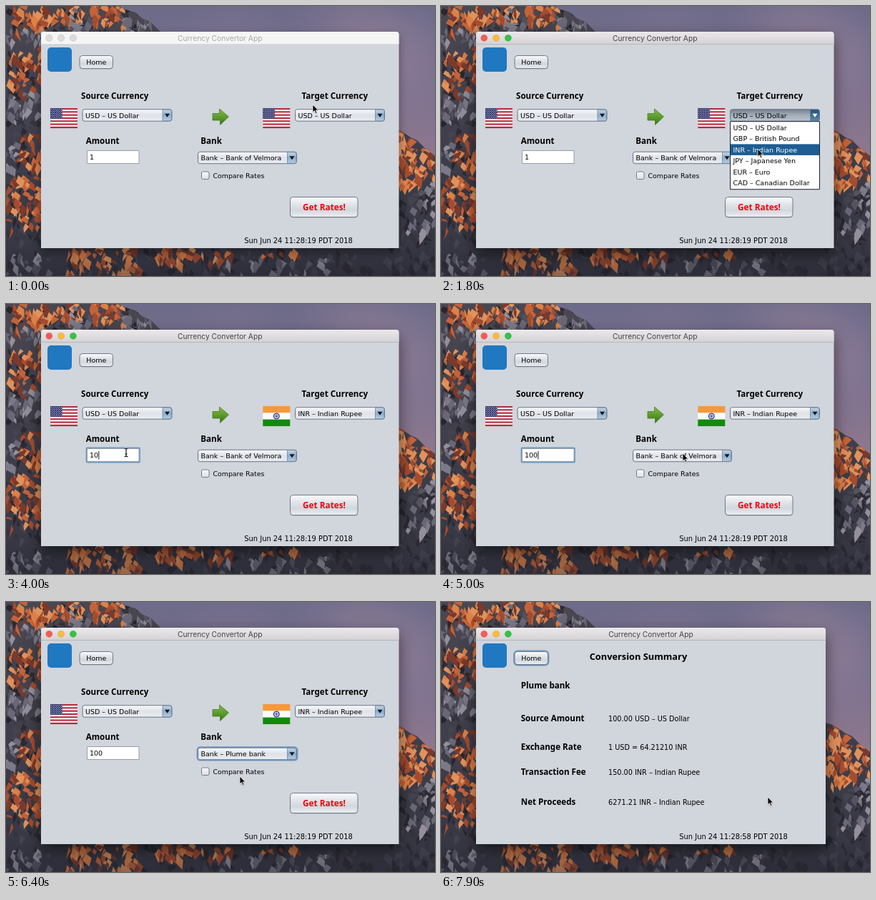
An HTML page with a canvas that plays this animation: 600x378 px, repeating every 8000 ms.

```html
<!DOCTYPE html>
<html lang="en">
<head>
<meta charset="utf-8">
<title>Currency Convertor App</title>
<style>
html, body { margin: 0; width: 100%; height: 100%; overflow: hidden; background: #3a3a48; }
canvas { display: block; width: 600px; height: 378px; }
</style>
</head>
<body>
<canvas id="stage"></canvas>
<script>
const W = 600, H = 378, LOOP = 8000;
const dpr = window.devicePixelRatio || 1;
const SANS = '"DejaVu Sans", sans-serif';
const BOLD = '"Noto Sans", sans-serif';

const CURRENCIES = ['USD – US Dollar', 'GBP – British Pound', 'INR – Indian Rupee',
  'JPY – Japanese Yen', 'EUR – Euro', 'CAD – Canadian Dollar'];
const BANKS = ['Bank – Bank of Velmora', 'Bank – Plume bank'];

// Moments of the interaction, in ms
const T = { open: 600, pick: 2050, field: 3250, key1: 3800, key2: 4050,
  bankOpen: 5300, bankPick: 5950, result: 7250 };

// Pointer path: time, x, y
const PATH = [
  [0, 429, 138], [500, 439, 148], [950, 439, 148], [1750, 443, 200], [2150, 443, 200],
  [2900, 168, 208], [4300, 168, 208], [4900, 338, 209], [5400, 338, 209],
  [5800, 330, 239], [6050, 329, 240], [6400, 327, 244], [7050, 455, 274], [7900, 457, 273]
];

function makeCanvas(el) {
  el.width = W * dpr;
  el.height = H * dpr;
  const ctx = el.getContext('2d');
  ctx.scale(dpr, dpr);
  return ctx;
}

const stage = document.getElementById('stage');
let c = makeCanvas(stage);

function rng(seed) {
  return () => (seed = (seed * 16807) % 2147483647) / 2147483647;
}

function poly(ctx, pts, fill) {
  ctx.beginPath();
  pts.forEach(([x, y]) => ctx.lineTo(x, y));
  ctx.closePath();
  ctx.fillStyle = fill;
  ctx.fill();
}

function vGrad(ctx, y0, y1, ...colors) {
  const g = ctx.createLinearGradient(0, y0, 0, y1);
  colors.forEach((col, i) => g.addColorStop(i / (colors.length - 1), col));
  return g;
}

// ---- Wallpaper ----

const FIRE = ['#c4633a', '#dc8148', '#a64c2e', '#7a3a2c', '#e0925c'];
const DARK = ['#26262f', '#34343f', '#444350', '#2d2a33'];
const SNOW = ['#7d7a88', '#6a6877', '#93909b', '#55535f'];

function facets(ctx, rand, x, y, w, h, n, colors) {
  for (let i = 0; i < n; i++) {
    const px = x + rand() * w, py = y + rand() * h;
    const len = 5 + rand() * 16, wide = 2 + rand() * 7, lean = (rand() - 0.35) * 12;
    poly(ctx, [[px, py], [px + wide, py + len * 0.35], [px + lean, py + len], [px - wide * 0.5, py + len * 0.5]],
      colors[Math.floor(rand() * colors.length)]);
  }
}

function paintWallpaper() {
  const el = document.createElement('canvas');
  const ctx = makeCanvas(el);
  const rand = rng(4711);
  ctx.fillStyle = vGrad(ctx, 0, 230, '#6d6b89', '#7b718f', '#93798d');
  ctx.fillRect(0, 0, W, H);
  for (let i = 0; i < 12; i++) {
    const x = 260 + rand() * 340, y = rand() * 170;
    const g = ctx.createRadialGradient(x, y, 0, x, y, 80);
    g.addColorStop(0, 'rgba(170,140,160,.14)');
    g.addColorStop(1, 'rgba(170,140,160,0)');
    ctx.fillStyle = g;
    ctx.fillRect(x - 80, y - 80, 160, 160);
  }
  ctx.save();
  poly(ctx, [[0, 0], [158, 0], [168, 5], [181, 9], [190, 17], [203, 23], [213, 33], [240, 60], [400, 140],
    [520, 165], [545, 171], [556, 177], [566, 184], [575, 188], [588, 201], [600, 210], [600, 378], [0, 378]],
    vGrad(ctx, 0, 378, '#4a4751', '#3f3e4a', '#363743'));
  ctx.clip();
  const bands = [
    [0, 0, 215, 40, 70, DARK], [0, 40, 52, 300, 90, DARK], [535, 255, 65, 100, 50, DARK],
    [0, 335, 600, 43, 130, DARK],
    [10, -5, 50, 36, 45, FIRE], [60, -5, 45, 24, 24, FIRE], [118, -4, 50, 30, 34, FIRE],
    [88, 2, 30, 32, 18, SNOW], [160, 8, 50, 30, 26, SNOW],
    [0, 28, 50, 20, 14, SNOW], [4, 55, 46, 60, 45, FIRE], [0, 118, 50, 42, 30, SNOW],
    [18, 172, 34, 50, 28, FIRE], [0, 235, 50, 75, 62, FIRE], [0, 190, 16, 40, 10, SNOW],
    [538, 168, 34, 85, 65, FIRE], [566, 195, 34, 50, 25, FIRE], [560, 245, 40, 70, 24, SNOW],
    [85, 335, 100, 36, 52, FIRE], [205, 334, 110, 22, 36, FIRE], [350, 338, 70, 12, 8, FIRE],
    [300, 350, 150, 28, 24, SNOW], [0, 345, 60, 30, 16, SNOW]
  ];
  bands.forEach(b => facets(ctx, rand, ...b));
  ctx.fillStyle = vGrad(ctx, 330, 378, 'rgba(30,31,42,0)', 'rgba(30,31,42,.4)');
  ctx.fillRect(0, 330, W, 48);
  ctx.restore();
  return el;
}

const wallpaper = paintWallpaper();

// ---- Basic pieces ----

function text(str, x, mid, opt = {}) {
  const size = opt.size || (opt.bold ? 11.6 : 9.5);
  c.font = (opt.bold ? 'bold ' : '') + size + 'px ' + (opt.font || (opt.bold ? BOLD : SANS));
  c.textAlign = opt.align || 'left';
  c.fillStyle = opt.color || '#000';
  c.fillText(str, x, mid + size * 0.36);
}

const bold = (str, x, mid, opt) => text(str, x, mid, { bold: true, ...opt });

function box(x, y, w, h, r, fill, stroke, line = 1) {
  c.beginPath();
  c.roundRect(x, y, w, h, r);
  c.fillStyle = fill;
  c.fill();
  if (stroke) {
    c.strokeStyle = stroke;
    c.lineWidth = line;
    c.stroke();
  }
}

function focusRing(x, y, w, h, r) {
  c.beginPath();
  c.roundRect(x - 1, y - 1, w + 2, h + 2, r + 1);
  c.strokeStyle = '#6e9ac4';
  c.lineWidth = 1.8;
  c.stroke();
}

function button(x, y, w, h, focused) {
  if (focused) focusRing(x, y, w, h, 4);
  box(x, y + 1, w, h, 4, 'rgba(80,88,100,.35)');
  box(x, y, w, h, 4, vGrad(c, y, y + h, '#fbfcfd', '#e3e6eb', '#d3d7de', '#eceff3'), '#717986');
}

function combo(x, y, w, label, { open, focused } = {}) {
  const h = 16.5, ax = x + w - 13;
  if (focused) focusRing(x, y, w, h, 3);
  box(x, y, w, h, 3, open ? vGrad(c, y, y + h, '#75808f', '#a3adba', '#b9c3cf')
    : vGrad(c, y, y + h, '#f8f9fb', '#dfe2e8', '#e9ecf1'), '#6c7584');
  box(ax, y + 0.4, 12.6, h - 0.8, [0, 3, 3, 0], open ? vGrad(c, y, y + h, '#27506f', '#3e6d93', '#5b88aa')
    : vGrad(c, y, y + h, '#c7d7e6', '#8fadc9', '#b7cfe2'), '#5e7d9b', 0.7);
  poly(c, [[ax + 3, y + 6], [ax + 10, y + 6], [ax + 6.5, y + 11]], open ? '#fff' : '#0c1520');
  text(label, x + 4, y + 8.7);
}

function popup(x, y, w, items, selected) {
  const row = 15.5;
  box(x, y, w, items.length * row + 2, 0, '#fff', '#1d2329');
  items.forEach((item, i) => {
    if (i === selected) {
      c.fillStyle = '#1d5d92';
      c.fillRect(x + 0.5, y + 0.7 + i * row, w - 1, row);
    }
    text(item, x + 4, y + 8.6 + i * row, { color: i === selected ? '#fff' : '#000' });
  });
}

function usFlag(x, y) {
  const w = 38, h = 28, s = h / 13;
  for (let i = 0; i < 13; i++) {
    c.fillStyle = i % 2 ? '#f6f1f2' : '#b82a3e';
    c.fillRect(x, y + i * s, w, s + 0.1);
  }
  c.fillStyle = '#343a70';
  c.fillRect(x, y, 16.5, s * 7);
  c.fillStyle = '#e6e7f0';
  for (let r = 0; r < 9; r++)
    for (let k = r % 2; k < 11; k += 2)
      c.fillRect(x + 0.9 + k * 1.42, y + 1 + r * 1.55, 0.9, 0.9);
}

function indiaFlag(x, y) {
  ['#f6993a', '#fbfbfb', '#128a0d'].forEach((col, i) => {
    c.fillStyle = col;
    c.fillRect(x, y + i * 9.33, 38, 9.4);
  });
  c.strokeStyle = '#17178a';
  c.lineWidth = 1;
  c.beginPath();
  c.arc(x + 19, y + 14, 4, 0, 7);
  c.stroke();
  c.lineWidth = 0.4;
  c.beginPath();
  for (let i = 0; i < 12; i++) {
    const a = i * Math.PI / 6;
    c.moveTo(x + 19, y + 14);
    c.lineTo(x + 19 + 4 * Math.cos(a), y + 14 + 4 * Math.sin(a));
  }
  c.stroke();
}

function greenArrow() {
  poly(c, [[289, 150.5], [298.5, 150.5], [298.5, 144], [311.5, 155], [299.5, 166.5], [299.5, 160], [289, 160]],
    vGrad(c, 144, 167, '#86b84a', '#5c9c2c', '#34701a'));
  c.strokeStyle = '#48801f';
  c.lineWidth = 0.8;
  c.stroke();
}

// ---- Window and screens ----

function frame(w, active) {
  c.save();
  c.shadowColor = active ? 'rgba(0,0,0,.55)' : 'rgba(0,0,0,.4)';
  c.shadowBlur = (active ? 22 : 14) * dpr;
  c.shadowOffsetY = (active ? 9 : 6) * dpr;
  box(49, 36, w, 303, [4, 4, 0, 0], '#d1d5dc');
  c.restore();
  box(49, 36, w, 17.5, [4, 4, 0, 0], active ? vGrad(c, 36, 54, '#ebe9eb', '#d3d1d3') : '#f5f5f6');
  c.fillStyle = active ? '#b3b1b5' : '#d5d5d8';
  c.fillRect(49, 53, w, 0.8);
  ['#fb5a54', '#fcbc3a', '#30c445'].forEach((col, i) => {
    c.beginPath();
    c.arc(60.3 + i * 16.8, 44.8, 4.6, 0, 7);
    c.fillStyle = active ? col : '#dcdcde';
    c.fill();
    c.strokeStyle = active ? 'rgba(0,0,0,.15)' : '#c3c3c6';
    c.lineWidth = 0.7;
    c.stroke();
  });
  text('Currency Convertor App', 49 + w / 2, 45, {
    size: 10.25, font: 'Inter, sans-serif', align: 'center', color: active ? '#444446' : '#a9a9ac'
  });
  box(58, 58, 34, 34, 5, '#1f78c0');
}

function homeButton(focused) {
  button(103, 69.5, 46.5, 18, focused);
  text('Home', 126.3, 78.7, { align: 'center' });
}

function form(t, pos) {
  const targetOpen = t >= T.open && t < T.pick;
  const picked = t >= T.pick;
  const fieldFocus = t >= T.field && t < T.bankOpen;
  const bankOpen = t >= T.bankOpen && t < T.bankPick;
  const chosen = t >= T.bankPick;

  homeButton(false);
  bold('Source Currency', 105, 126.3);
  bold('Target Currency', 413.5, 126.3);
  usFlag(62, 143);
  (picked ? indiaFlag : usFlag)(359.3, 143);
  greenArrow();
  combo(107, 144.7, 125, CURRENCIES[0]);
  combo(404.5, 144.7, 125, CURRENCIES[picked ? 2 : 0], { open: targetOpen, focused: picked && t < T.field });

  bold('Amount', 111.7, 189);
  bold('Bank', 272.3, 189);
  const amount = '1' + (t >= T.key1 ? '0' : '') + (t >= T.key2 ? '0' : '');
  if (fieldFocus) focusRing(113.5, 202.5, 72.5, 18, 0);
  box(113.5, 202.5, 72.5, 18, 0, '#fff', '#9096a0', 0.9);
  text(amount, 117, 212);
  if (fieldFocus) {
    const x = 117.3 + c.measureText(amount).width;
    c.fillStyle = '#000';
    c.fillRect(x, 206, 0.9, 11.5);
  }
  combo(268.5, 204.2, 138, BANKS[chosen ? 1 : 0], { open: bankOpen, focused: chosen });

  box(273.5, 232, 10.5, 10.5, 2, vGrad(c, 232, 243, '#fbfbfc', '#d9dde3'), '#737b88');
  text('Compare Rates', 289.5, 238, { size: 9.4 });
  button(397.5, 267.5, 94.5, 28, chosen && t > T.result - 120);
  bold('Get Rates!', 445, 282, { align: 'center', color: '#f4000c', size: 11.8 });
  text('Sun Jun 24 11:28:19 PDT 2018', 333.3, 328, { size: 9.9 });

  if (targetOpen) popup(404.5, 161.7, 125, CURRENCIES, rowAt(pos.y, 162, 6));
  if (bankOpen) popup(268.5, 221, 138, BANKS, rowAt(pos.y, 221, 2));
}

function rowAt(y, top, count) {
  return Math.max(0, Math.min(count - 1, Math.floor((y - top) / 15.5)));
}

function summary() {
  homeButton(true);
  bold('Conversion Summary', 207.7, 76.5, { size: 12.8 });
  bold('Plume bank', 111.7, 117.3);
  [
    ['Source Amount', '100.00 USD – US Dollar', 163],
    ['Exchange Rate', '1 USD = 64.21210 INR', 203],
    ['Transaction Fee', '150.00 INR – Indian Rupee', 238.3],
    ['Net Proceeds', '6271.21 INR – Indian Rupee', 279.7]
  ].forEach(([label, value, y]) => {
    bold(label, 111.7, y);
    text(value, 234, y + 0.4, { size: 9.7 });
  });
  text('Sun Jun 24 11:28:58 PDT 2018', 333.3, 328, { size: 9.9 });
}

// ---- Pointer ----

function pointerAt(t) {
  let i = 0;
  while (i < PATH.length - 2 && t >= PATH[i + 1][0]) i++;
  const [t0, x0, y0] = PATH[i], [t1, x1, y1] = PATH[i + 1];
  const p = Math.min(1, (t - t0) / (t1 - t0));
  const e = p * p * (3 - 2 * p);
  return { x: x0 + (x1 - x0) * e, y: y0 + (y1 - y0) * e };
}

function strokeLines(lines, color, width) {
  c.beginPath();
  lines.forEach(([x0, y0, x1, y1]) => { c.moveTo(x0, y0); c.lineTo(x1, y1); });
  c.strokeStyle = color;
  c.lineWidth = width;
  c.stroke();
}

function pointer({ x, y }, overField) {
  c.save();
  c.translate(x, y);
  if (overField) {
    const beam = [[0, -5, 0, 5], [0, -5, -2.5, -6], [0, -5, 2.5, -6], [0, 5, -2.5, 6], [0, 5, 2.5, 6], [-1.5, 2, 1.5, 2]];
    strokeLines(beam, 'rgba(255,255,255,.8)', 2.4);
    strokeLines(beam, '#000', 1.1);
  } else {
    c.shadowColor = 'rgba(0,0,0,.35)';
    c.shadowBlur = 2 * dpr;
    c.shadowOffsetY = dpr;
    poly(c, [[0, 0], [0, 10.8], [2.5, 8.6], [4.2, 12.6], [6, 11.8], [4.3, 8], [7.7, 8]], '#000');
    c.shadowColor = 'transparent';
    c.strokeStyle = '#fff';
    c.lineWidth = 0.8;
    c.stroke();
  }
  c.restore();
}

function draw(now) {
  const t = now % LOOP;
  const pos = pointerAt(t);
  const done = t >= T.result;
  c.drawImage(wallpaper, 0, 0, W, H);
  frame(done ? 489 : 500.5, t >= T.open - 100);
  if (done) summary();
  else form(t, pos);
  const overField = !done && pos.x > 113 && pos.x < 187 && pos.y > 202 && pos.y < 221;
  pointer(pos, overField);
}

const start = performance.now();
function tick() {
  draw(performance.now() - start);
  requestAnimationFrame(tick);
}
tick();
</script>
</body>
</html>
```
